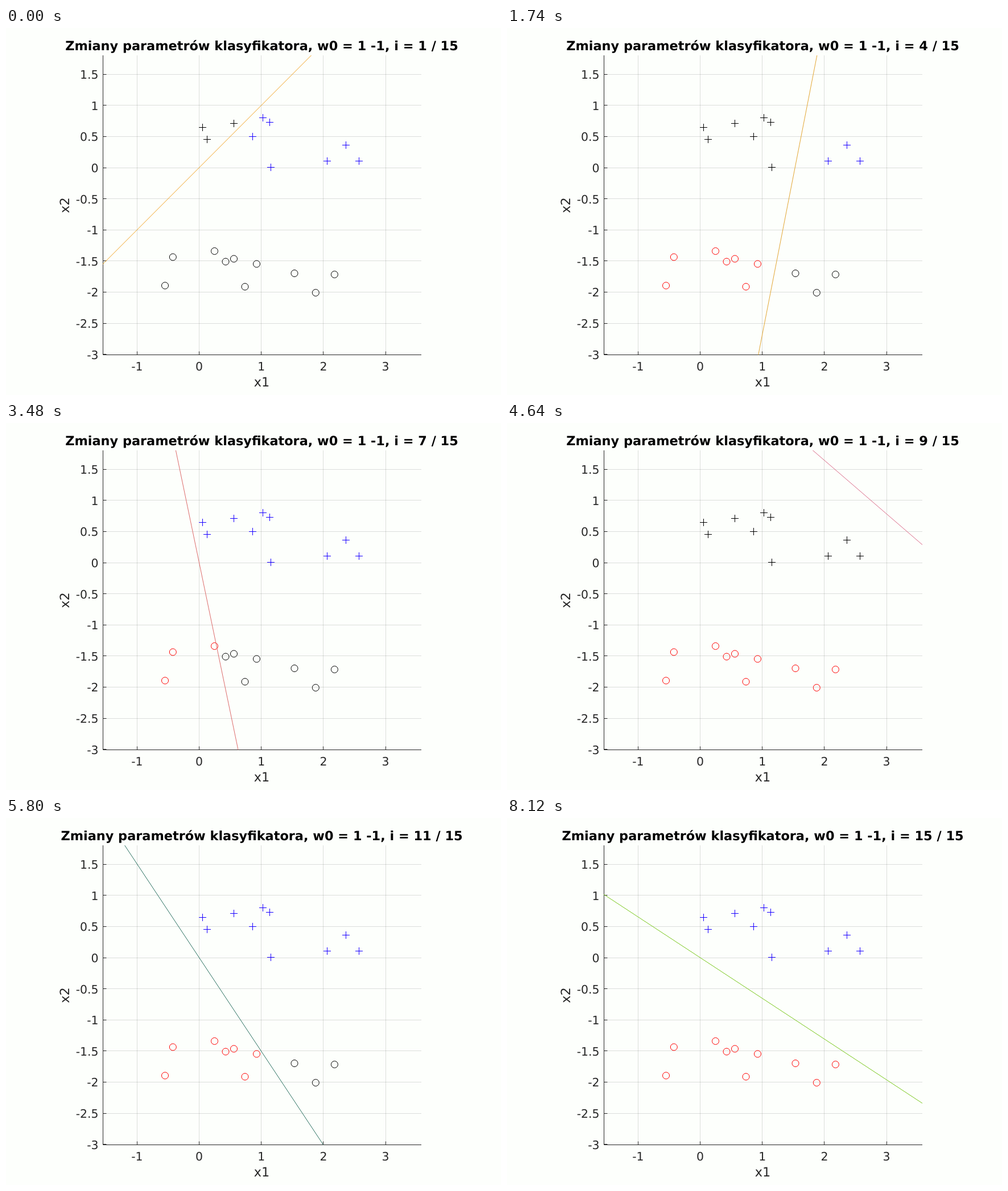
Animation of 870x644 px, one loop 8.7 s. Source, as an HTML page:

```html
<!DOCTYPE html>
<html lang="pl">
<head>
<meta charset="utf-8">
<style>
  html, body { margin: 0; width: 100%; height: 100%; overflow: hidden; background: #fdfffc; }
  svg { display: block; }
  text { font-family: "DejaVu Sans", sans-serif; font-size: 20.4px; fill: #262626; text-rendering: geometricPrecision; }
  .label { font-size: 22.4px; }
  .title { font-size: 22.4px; font-weight: bold; fill: #000; }
  .grid { stroke: #262626; stroke-opacity: .15; }
  .axis { stroke: #262626; fill: none; }
</style>
</head>
<body>
<svg id="stage" width="870" height="644" viewBox="0 0 870 644">
  <clipPath id="plot"><rect x="170" y="48" width="560" height="525.5"/></clipPath>
</svg>
<script>
const STEP = 580, ETA = 0.2;
const SCALE = 109.2, X0 = 339.5, Y0 = 245;
const LEFT = 170.5, RIGHT = 730, TOP = 48, BOTTOM = 573.5;
const px = x => X0 + SCALE * x;
const py = y => Y0 - SCALE * y;
const crisp = v => Math.floor(v) + 0.5;

const stage = document.getElementById('stage');
function add(tag, attrs, text) {
  const el = document.createElementNS('http://www.w3.org/2000/svg', tag);
  for (const key in attrs) el.setAttribute(key, attrs[key]);
  if (text !== undefined) el.textContent = text;
  return stage.appendChild(el);
}

// Samples of both classes, in screen coordinates
const pluses = [[345, 174], [353, 195], [400.5, 167.5], [451.5, 157], [463, 165.5],
  [433, 190], [465, 244], [564, 233], [597, 205.5], [620.5, 233]];
const circles = [[279.5, 452], [293.3, 402], [366.5, 391.5], [386, 410], [400.5, 405],
  [440.5, 414], [420, 454], [507, 430.5], [544.3, 464.5], [577.4, 432.5]];
const sample = label => ([sx, sy]) => ({ sx, sy, label, x: (sx - X0) / SCALE, y: (Y0 - sy) / SCALE });
const samples = [...pluses.map(sample(1)), ...circles.map(sample(-1))];

// Perceptron training: index of the sample used for each update
const updates = [0, 14, 10, 18, 8, 6, 14, 19, 8, 6, 18, 6, 19, 6];
const radius2 = Math.max(...samples.map(s => s.x * s.x + s.y * s.y));
const states = [{ w1: 1, w2: -1, b: 0 }];
for (const index of updates) {
  const { w1, w2, b } = states[states.length - 1];
  const { x, y, label } = samples[index];
  const rate = ETA * label;
  states.push({ w1: w1 + rate * x, w2: w2 + rate * y, b: b + rate * radius2 });
}
const colors = ['#f0a01e', '#eca226', '#e8a42c', '#e2a634', '#e09048', '#de7c58', '#dc6a6a', '#da6c7a',
  '#d96c88', '#806c78', '#2a7060', '#489860', '#68c05c', '#70c440', '#7ac81e'];

// Static axes
for (let v = -1; v <= 3; v++) {
  const x = crisp(px(v));
  add('path', { class: 'grid', d: `M${x} ${TOP}V${BOTTOM}` });
  add('path', { class: 'axis', d: `M${x} ${BOTTOM}v-6` });
  add('text', { x: px(v), y: 601, 'text-anchor': 'middle' }, v);
}
for (let v = -3; v <= 1.5; v += 0.5) {
  const y = crisp(py(v));
  if (v > -3) add('path', { class: 'grid', d: `M${LEFT} ${y}H${RIGHT}` });
  add('path', { class: 'axis', d: `M${LEFT} ${y}h6` });
  add('text', { x: 162.5, y: py(v) + 8, 'text-anchor': 'end' }, v);
}
add('path', { class: 'axis', d: `M${LEFT} ${TOP}V${BOTTOM}H${RIGHT}` });
add('text', { class: 'label', x: 449.5, y: 629, 'text-anchor': 'middle' }, 'x1');
add('text', { class: 'label', transform: 'translate(111 311) rotate(-90)', 'text-anchor': 'middle' }, 'x2');

// Animated parts
const title = add('text', { class: 'title', x: 449.5, y: 39, 'text-anchor': 'middle' });
const marks = samples.map(({ sx, sy, label }) => label > 0
  ? add('path', { d: `M${crisp(sx) - 6.5} ${crisp(sy)}h13m-6.5 -6.5v13` })
  : add('circle', { cx: sx, cy: sy, r: 6, fill: 'none' }));
const boundary = add('line', { 'clip-path': 'url(#plot)', 'stroke-width': 1 });

function render(index) {
  const { w1, w2, b } = states[index];
  title.textContent = `Zmiany parametrów klasyfikatora, w0 = 1 -1, i = ${index + 1} / ${states.length}`;
  samples.forEach(({ x, y, label }, i) => {
    const correct = label * (w1 * x + w2 * y + b) > 0;
    marks[i].setAttribute('stroke', !correct ? '#000' : label > 0 ? '#1a00ff' : '#ff0000');
  });
  const norm = Math.hypot(w1, w2);
  const cx = -b * w1 / norm ** 2, cy = -b * w2 / norm ** 2;
  const dx = -w2 / norm * 10, dy = w1 / norm * 10;
  const ends = { x1: px(cx - dx), y1: py(cy - dy), x2: px(cx + dx), y2: py(cy + dy), stroke: colors[index] };
  for (const key in ends) boundary.setAttribute(key, ends[key]);
}

const start = performance.now();
let shown = -1;
function tick() {
  const index = Math.floor((performance.now() - start) / STEP) % states.length;
  if (index !== shown) render(shown = index);
  requestAnimationFrame(tick);
}
tick();
</script>
</body>
</html>
```
